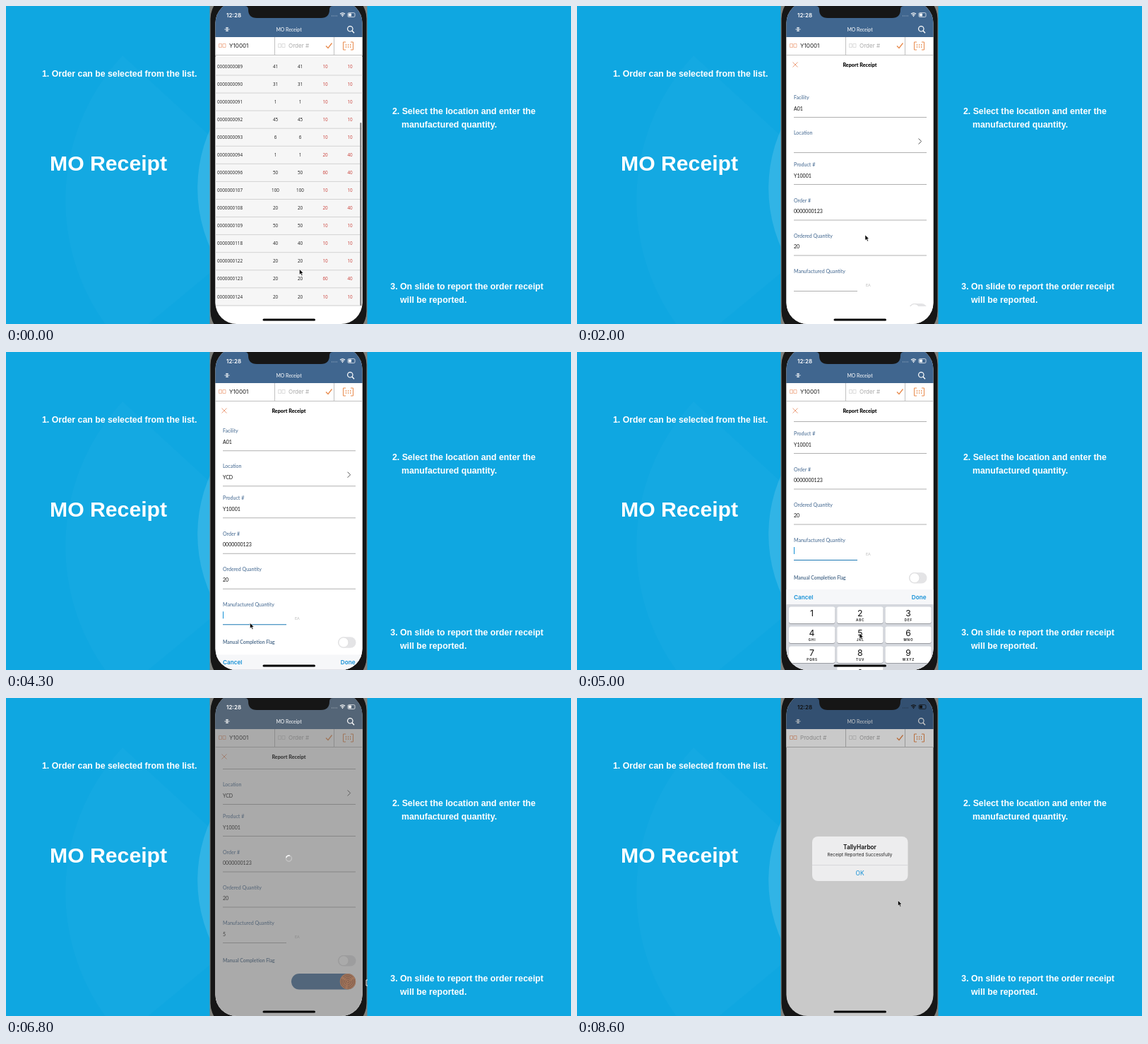
Animation, 800 px wide and 450 px high, one loop 8.7 s. Source, as an HTML page:

```html
<!DOCTYPE html>
<html lang="en">
<head>
<meta charset="utf-8">
<title>MO Receipt</title>
<style>
html, body { margin: 0; width: 100%; height: 100%; overflow: hidden; background: #0fa7e1; }
svg { display: block; width: 100vw; height: 100vh; }
.side { font-family: "Liberation Sans", Arial, sans-serif; font-weight: 700; }
.form { font-family: Lato, sans-serif; }
.rows { font-family: "Open Sans", sans-serif; }
.ios { font-family: Inter, sans-serif; }
</style>
</head>
<body>
<svg id="stage" viewBox="0 0 800 450"></svg>
<script>
const LOOP = 8700;
const INK = '#1c1c1c', BLUE = '#40668f', ORANGE = '#e88a4c', SKY = '#1490d6', RULE = '#b0b0b0';

const text = (x, y, s, size, fill, more = '') =>
  `<text x="${x}" y="${y}" font-size="${size}" fill="${fill}" ${more}>${s}</text>`;
const rect = (x, y, w, h, fill, more = '') =>
  `<rect x="${x}" y="${y}" width="${w}" height="${h}" fill="${fill}" ${more}/>`;
const band = (y, h, fill, more = '') => rect(296, y, 209, h, fill, more); // full screen width
const line = (d, color, width = 1, more = '') =>
  `<path d="${d}" fill="none" stroke="${color}" stroke-width="${width}" ${more}/>`;
const group = (id, body, more = '') => `<g id="${id}" ${more}>${body}</g>`;
const MID = 'text-anchor="middle"', BOLD = 'font-weight="700"', SEMI = 'font-weight="600"';

const backdrop = () =>
  rect(0, 0, 800, 450, '#0fa7e1') +
  '<path d="M400 286L165 70A300 300 0 0 0 165 480z" fill="#fff" opacity=".018"/>' +
  '<path d="M400 67A206 206 0 0 0 400 449z" fill="#fff" opacity=".12"/>' +
  group('captions',
    text(62, 233, 'MO Receipt', 30.2, '#fff') +
    [[51, 100, '1. Order can be selected from the list.'],
     [547, 153, '2. Select the location and enter the'],
     [560, 172, 'manufactured quantity.'],
     [544.3, 401, '3. On slide to report the order receipt'],
     [558, 420, 'will be reported.']].map(([x, y, s]) => text(x, y, s, 12.3, '#fff')).join(''),
    'class="side"');

// order number, quantity, two red columns
const orders = [
  [89, 41, 10, 10], [90, 31, 10, 10], [91, 1, 10, 10], [92, 45, 10, 10], [93, 6, 10, 10],
  [94, 1, 20, 40], [96, 50, 60, 40], [107, 100, 10, 10], [108, 20, 20, 40], [109, 50, 10, 10],
  [118, 40, 10, 10], [122, 20, 10, 10], [123, 20, 60, 40], [124, 20, 10, 10]];

const list = () => group('list', band(72, 353, '#f6f6f6') +
  orders.map(([id, qty, a, b], i) => {
    const y = 87.6 + 25.07 * i;
    return text(299, y, String(id).padStart(10, '0'), 6.3, INK) +
      [qty, qty, a, b].map((n, c) =>
        text([381.5, 416.5, 452, 487][c], y, n, 6.3, c < 2 ? INK : '#c93a33', MID)).join('') +
      line(`M296 ${y + 10.4}h209`, '#d3d3d3');
  }).join('') +
  rect(501.3, 165, 2, 259, '#777', 'rx="1"'), 'class="rows"');

const field = (y, label, value, width = 188, id = '') =>
  text(307, y, label, 7.05, BLUE) +
  text(307, y + 15.5, value, 7.05, '#111', `id="${id}Value"`) +
  line(`M307 ${y + 25.5}h${width}`, RULE, 1, `id="${id}Line"`);

const slider = () => group('slider',
  rect(404, 447, 91, 22.5, '#3c6998', 'rx="11.25"') +
  group('knob', '<circle r="11.2" fill="#f08a4e"/>' +
    [2, 4.5, 7, 9.3].map(r => `<circle r="${r}" fill="none" stroke="#7a3d25" stroke-width=".8" ` +
      `stroke-dasharray="${r * 1.6} ${r * .35}"/>`).join('')));

const form = () => group('form', band(70, 380, '#fff') +
  '<g clip-path="url(#formClip)">' + group('fields',
    field(132, 'Facility', 'A01') +
    field(182, 'Location', 'YCD', 188, 'loc') +
    line('M483.6 187.5l4 4-4 4', '#555', 1) +
    field(227, 'Product #', 'Y10001') +
    field(277.5, 'Order #', '0000000123') +
    field(327.5, 'Ordered Quantity', '20') +
    field(378, 'Manufactured Quantity', '5', 90, 'qty') +
    rect(307, 385, 1, 10, SKY, 'id="caret"') +
    text(409, 397, 'EA', 5.4, '#bbb') +
    text(307, 431, 'Manual Completion Flag', 6.8, '#557391', BOLD) +
    rect(470, 421, 25.5, 15.5, '#e4e4e6', 'rx="7.75"') +
    '<circle cx="478" cy="428.7" r="7" fill="#fff" stroke="#ccc" stroke-width=".5"/>' +
    slider()) + '</g>' +
  line('M305.5 79.5l7 7m0-7l-7 7', '#e8895f', .8) +
  text(400.5, 86, 'Report Receipt', 7.2, '#111', `${MID} font-weight="900"`), 'class="form"');

const pair = (x, color) => line(`M${x} 53.5h4v5h-4zm5.5 0h4v5h-4z`, color, .7);
const header = () =>
  band(0, 44, BLUE) + band(44, 26, '#fff') +
  line('M296 69.5h209M380.5 44v25M464.5 44v25', '#b0b0b0', .8) +
  pair(301.5, '#eda07a') + pair(385.5, '#d0d0d0') +
  line('M453 56.5l3 3 5.5-7', ORANGE, 1.3) +
  line('M481 51h-3.5v11h3.5M488 51h3.5v11h-3.5', ORANGE, 1) +
  line('M481.5 54v5M484.5 54v5M487.5 54v5', ORANGE, 1, 'stroke-dasharray="2 1"') +
  group('inputs', text(316, 59.3, '', 8.1, INK, 'id="product"') +
    text(400, 59.3, 'Order #', 8.1, '#aaa'), 'class="ios"');

const headerTop = () =>
  text(400.5, 36, 'MO Receipt', 6.9, '#fff', MID + ' class="form"') +
  line('M311 30.8h4M309.5 33h7M311 35.2h4M313 30v6', '#fff', .9) +
  '<circle cx="487.3" cy="32.3" r="3.7" fill="none" stroke="#fff" stroke-width="1.2"/>' +
  line('M490 35.1l3 3.2', '#fff', 1.4);

const status = () => group('status',
  text(312, 15.7, '12:28', 8, 'currentColor', SEMI + ' stroke="none"') +
  '<path d="M461 14h8" stroke-width="1" stroke-dasharray="1 1.3" opacity=".5" fill="none"/>' +
  '<path d="M473 11.3q3.5-3 7 0M474.6 13q1.9-1.6 3.8 0" stroke-width="1.2" fill="none"/>' +
  '<circle cx="476.5" cy="14.4" r=".8" stroke="none"/>' +
  '<rect x="484" y="9.6" width="10" height="6" rx="1.5" fill="none" stroke-width=".7"/>' +
  '<rect x="485" y="10.6" width="4" height="4" rx=".6" stroke="none"/>',
  'class="ios" fill="currentColor" stroke="currentColor"');

// drawn at its raised position
const keypad = () => {
  const names = ['', 'ABC', 'DEF', 'GHI', 'JKL', 'MNO', 'PQRS', 'TUV', 'WXYZ'];
  const key = (n, name, col, row) => {
    const x = 300 + 68.2 * col, y = 360.5 + 28 * row;
    return rect(x, y + 1, 65.3, 23.6, '#9a9ca2', 'rx="3"') +
      rect(x, y, 65.3, 23.6, '#fff', `rx="3" id="key${n}"`) +
      text(x + 32.6, y + 13, n, 12.3, '#111', MID) +
      text(x + 33, y + 20.6, name, 4.6, '#111', `${MID} ${SEMI} letter-spacing=".8"`);
  };
  return group('keypad', band(336, 21.5, '#f6f7f9') + band(357, 100, '#d4d7dd') +
    text(307, 349.5, 'Cancel', 8.2, SKY, SEMI) +
    text(494.5, 349.5, 'Done', 8.2, SKY, SEMI + ' text-anchor="end" id="done"') +
    names.map((s, i) => key(i + 1, s, i % 3, i / 3 | 0)).join('') + key(0, '', 1, 3),
    'class="ios"');
};

const alertBox = () => group('alert', rect(333, 196, 135.5, 63, '#ededee', 'rx="8"') +
  text(400.5, 214, 'TallyHarbor', 8.3, '#111', `${MID} ${SEMI}`) +
  text(400.5, 224.3, 'Receipt Reported Successfully', 6.35, '#222', MID) +
  line('M333 236.5h135.5', '#cfcfd1', .7) +
  text(400.5, 250.7, 'OK', 8.4, SKY, MID), 'class="ios"');

const stage = document.getElementById('stage');
stage.innerHTML = `<defs>
  <clipPath id="screen"><rect x="296.5" y="-6" width="208" height="456" rx="30"/></clipPath>
  <clipPath id="formClip"><rect id="formArea" x="296" y="95" width="209" height="330"/></clipPath>
  </defs>` + backdrop() +
  rect(288.5, 0, 223, 450, '#80807c') + rect(289.5, -18, 221, 486, '#161616', 'rx="36"') +
  '<g clip-path="url(#screen)">' + band(0, 450, '#fff') + list() + form() + header() +
  band(0, 450, '#646464', 'id="shade"') + headerTop() + keypad() +
  band(0, 450, '#000', 'id="dim"') + status() +
  '<path d="M338 0q5 0 5 5 0 12 12 12h91q12 0 12-12 0-5 5-5z" fill="#161616"/>' +
  rect(363.5, 442.6, 74.5, 3, '#050505', 'rx="1.5"') +
  group('spinner', '<circle r="4" fill="none" stroke="#c4c4c4" stroke-width="1.3"/>' +
    line('M0-4a4 4 0 0 1 4 4', '#fff', 1.5)) + alertBox() + '</g>' +
  group('arrow', '<path d="M0 0v7.6l1.8-1.6 1.3 2.9 1.3-.6-1.3-2.8h2.4z" fill="#000" stroke="#fff" stroke-width=".5"/>') +
  line('M512 399h-2v8h2', '#fff', .9, 'id="beam"');

const $ = id => document.getElementById(id);
const clamp = u => Math.max(0, Math.min(1, u));
const ease = (t, a, b) => { const u = clamp((t - a) / (b - a)); return u * u * (3 - 2 * u); };
const show = (id, on) => $(id).style.display = on ? '' : 'none';
const move = (id, x, y, more = '') => $(id).setAttribute('transform', `translate(${x} ${y}) ${more}`);

// pointer stops: time, x, y
const stops = [[0, 415.5, 372.5], [100, 415.5, 372.5], [500, 400, 394], [1500, 400, 394], [2000, 408, 324],
  [2450, 408, 324], [2700, 486, 190], [2850, 486, 190], [3700, 390, 308], [3950, 390, 308],
  [4200, 345.5, 383.5], [4400, 345.5, 383.5], [4900, 400, 398], [5300, 400, 398], [5700, 484, 344],
  [5900, 484, 344], [6100, 476, 290.5], [6400, 415, 401], [6500, 415, 401], [6750, 506, 402],
  [6900, 506, 402], [7600, 480, 300], [8500, 469, 291], [8600, 454.5, 286.5]];

function pointer(t) {
  const i = stops.findIndex(s => s[0] > t);
  if (i < 0) return stops.at(-1).slice(1);
  const a = stops[i - 1], b = stops[i], k = ease(t, a[0], b[0]);
  return [a[1] + (b[1] - a[1]) * k, a[2] + (b[2] - a[2]) * k];
}

function draw(t) {
  const loading1 = t >= 700 && t < 1500, loading2 = t >= 6780 && t < 7650;
  const cleared = t >= 7650;

  show('list', t < 1900);
  move('list', 0, t >= 700 ? 1 : 0);
  show('form', t >= 1500 && !cleared);
  move('form', 0, 380 * (1 - ease(t, 1500, 1900)));

  const lowered = ease(t, 6120, 6400);
  const raised = ease(t, 4200, 4562) - lowered;
  move('fields', 0, 52 * lowered - 109 * ease(t, 4200, 4595));
  $('formArea').setAttribute('height', t < 4200 ? 330 : 355);
  show('keypad', raised > 0);
  move('keypad', 0, 114 * (1 - raised));
  $('done').setAttribute('opacity', t >= 5900 ? .35 : 1);
  $('key5').setAttribute('fill', t >= 5100 && t < 5250 ? '#b9bdc6' : '#fff');

  const focus = t >= 4200 && t < 6000;
  show('locValue', t >= 2900);
  show('qtyValue', t >= 5200);
  show('caret', focus && t < 5200);
  $('qtyLine').setAttribute('stroke', focus ? '#1b78b4' : RULE);
  show('slider', t >= 6100);
  move('knob', 415.5 + 68.5 * ease(t, 6500, 6750), 458.2);

  const product = $('product');
  product.textContent = cleared ? 'Product #' : 'Y10001';
  product.setAttribute('fill', cleared ? '#aaa' : INK);

  $('shade').setAttribute('opacity', loading1 || loading2 ? .55 : 0);
  show('spinner', loading1 || loading2);
  move('spinner', 400.5, 227, `rotate(${Math.min(t, loading1 ? 1300 : LOOP) * .36})`);

  const pop = ease(t, 7750, 8000);
  $('dim').setAttribute('opacity', .21 * pop);
  $('status').style.color = pop > .5 ? '#111' : '#fff';
  $('alert').setAttribute('opacity', pop);
  const size = 1.12 - .12 * pop;
  move('alert', 400.5 * (1 - size), 227.5 * (1 - size), `scale(${size})`);

  move('arrow', ...pointer(t));
  show('arrow', t < 6740 || t >= 7000);
  show('beam', t >= 6740 && t < 7000);
}

const start = performance.now();
function tick() {
  draw((performance.now() - start) % LOOP);
  requestAnimationFrame(tick);
}
tick();
</script>
</body>
</html>
```
